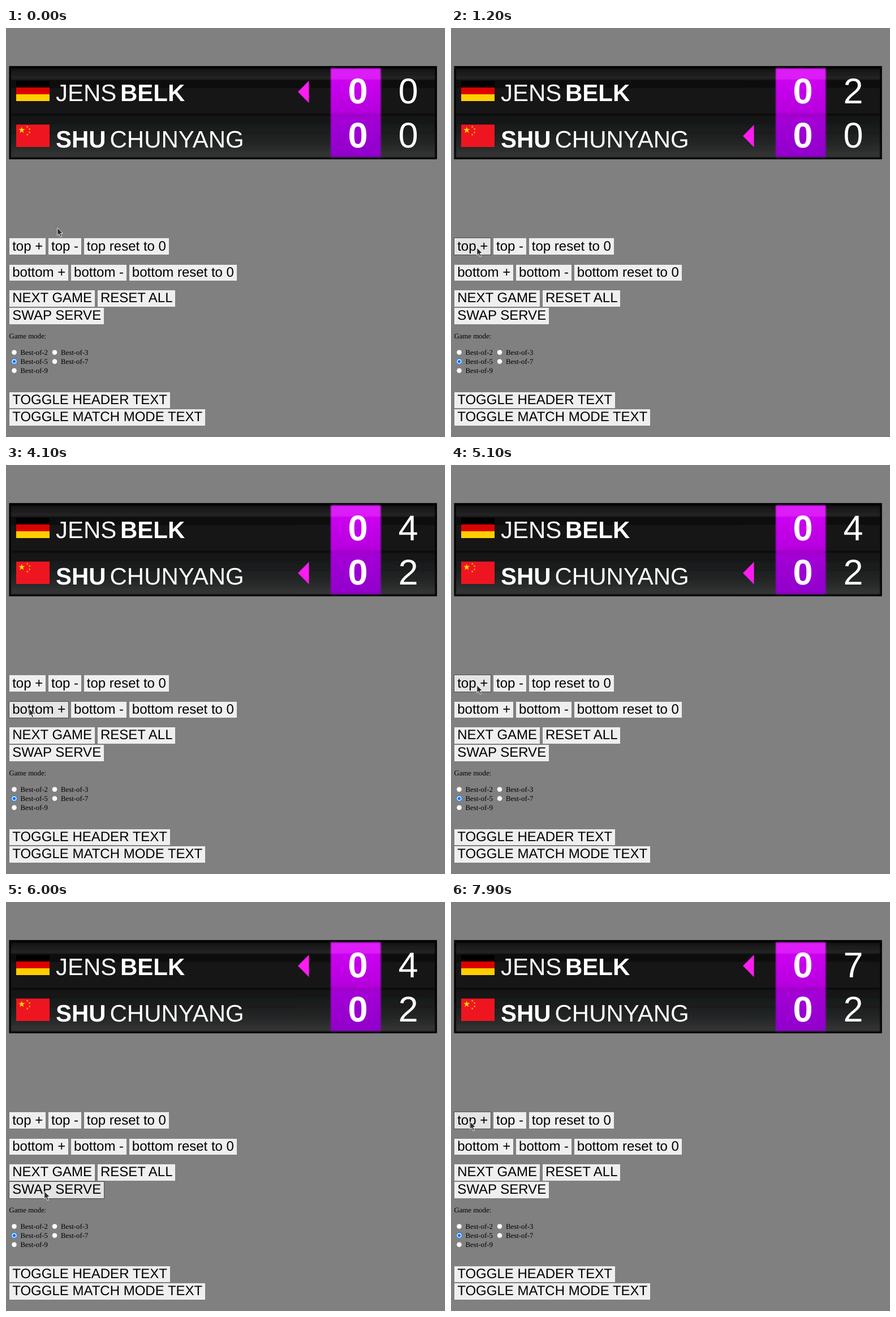
An HTML page for the animation above (8000 ms loop, 776 by 722 pixels).

```html
<!DOCTYPE html>
<html lang="en">
<head>
<meta charset="utf-8">
<title>Score board</title>
<style>
  html, body { margin: 0; width: 100%; height: 100%; overflow: hidden; background: #808080; }
  body { text-rendering: geometricPrecision; }
  svg { position: absolute; left: 0; top: 0; }
  .sans { font-family: "Liberation Sans", Arial, sans-serif; fill: #fff; }
  .name { font-size: 42px; }
  .score { font-size: 63px; text-anchor: middle; }
  .bold { font-weight: bold; }
  .label { font: 12.8px "Liberation Serif", "Times New Roman", serif; }
  .row { position: absolute; left: 5.4px; display: flex; gap: 3.2px; }
  .button {
    box-sizing: border-box; height: 30.8px; padding: .2px 4.8px; border: 1px solid #7f7f7f;
    font: 24px/27px "Liberation Sans", Arial, sans-serif; white-space: pre;
    color: #000; background: #efefef;
  }
  .hover { background: #e4e4e5; border-color: #4c4c4c; }
  .pressed { background: #f5f5f5; }
</style>
</head>
<body>
<svg id="board" width="776" height="722">
  <defs>
    <linearGradient id="panel" gradientUnits="userSpaceOnUse" x1="0" y1="70" x2="0" y2="230">
      <stop offset="0" stop-color="#0a0a0a"/>
      <stop offset=".03" stop-color="#181818"/>
      <stop offset=".12" stop-color="#242424"/>
      <stop offset=".14" stop-color="#101010"/>
      <stop offset=".49" stop-color="#171717"/>
      <stop offset=".515" stop-color="#0e0e0e"/>
      <stop offset=".55" stop-color="#141616"/>
      <stop offset=".8" stop-color="#212323"/>
      <stop offset="1" stop-color="#363737"/>
    </linearGradient>
    <linearGradient id="games" gradientUnits="userSpaceOnUse" x1="0" y1="70" x2="0" y2="230">
      <stop offset="0" stop-color="#c010dc"/>
      <stop offset=".025" stop-color="#de1cf8"/>
      <stop offset=".12" stop-color="#dc20f6"/>
      <stop offset=".14" stop-color="#cc00f0"/>
      <stop offset=".49" stop-color="#b600de"/>
      <stop offset=".52" stop-color="#a000c8"/>
      <stop offset=".56" stop-color="#a400d6"/>
      <stop offset=".97" stop-color="#9200cc"/>
      <stop offset="1" stop-color="#7c00b0"/>
    </linearGradient>
    <filter id="soft"><feGaussianBlur stdDeviation="1"/></filter>
    <polygon id="star" fill="#ffde00" points="0,-1 .225,-.309 .951,-.309 .363,.118 .588,.809 0,.382 -.588,.809 -.363,.118 -.951,-.309 -.225,-.309"/>
  </defs>

  <rect x="5.400" y="67.200" width="756.400" height="164.500"/>
  <rect x="8.500" y="70.500" width="750" height="158" fill="url(#panel)" filter="url(#soft)"/>
  <rect x="574" y="71" width="88.500" height="157" fill="url(#games)" filter="url(#soft)"/>

  <rect x="18" y="93.500" width="59" height="12"/>
  <rect x="18" y="105" width="59" height="12" fill="#d00"/>
  <rect x="18" y="117" width="59" height="12" fill="#ffce00"/>
  <rect x="18" y="170.500" width="59" height="39.500" fill="#ef1520"/>
  <use href="#star" transform="translate(27.800 180.400) scale(5.900)"/>
  <g id="stars"></g>

  <g class="sans name">
    <text x="88" y="129">JENS</text>
    <text class="bold" x="202" y="129">BELK</text>
    <text class="bold" x="88" y="211">SHU</text>
    <text x="183.500" y="211">CHUNYANG</text>
  </g>
  <g class="sans score">
    <text class="bold" x="622" y="132.600">0</text>
    <text class="bold" x="622" y="210.600">0</text>
    <text id="top" x="711" y="132.600"></text>
    <text id="bottom" x="711" y="210.600"></text>
  </g>
  <path id="serve" d="M516 112.800L535.500 93V132.500z" fill="#ff1cf0"/>

  <text class="label" x="5.400" y="548">Game mode:</text>
  <g id="modes" class="label"></g>
</svg>

<svg id="pointer" width="20" height="26" viewBox="-2 -2 20 26">
  <path d="M.8 .9V14.200L3.900 11.500L6.300 17L8.600 16L6.300 10.600L10.300 10.300z"
        fill="#2b2b2b" stroke="#fff" stroke-width=".9"/>
</svg>

<script>
const $ = id => document.getElementById(id);
const LOOP = 8000, STEP = 100;

const rows = [
  [370.4, 'top +', 'top -', 'top reset to 0'],
  [416.5, 'bottom +', 'bottom -', 'bottom reset to 0'],
  [462.2, 'NEXT GAME', 'RESET ALL'],
  [493, 'SWAP SERVE'],
  [641.5, 'TOGGLE HEADER TEXT'],
  [672.3, 'TOGGLE MATCH MODE TEXT']
];
const buttons = [];
for (const [y, ...labels] of rows) {
  const row = document.createElement('div');
  row.className = 'row';
  row.style.top = y + 'px';
  for (const label of labels) {
    const button = document.createElement('div');
    button.textContent = label;
    button.className = 'button';
    row.append(button);
    buttons.push(button);
  }
  document.body.insertBefore(row, $('pointer'));
}

$('stars').innerHTML = [[37.7, 174.4], [41.6, 178.4], [41.6, 184.3], [37.7, 188.2]]
  .map(([x, y]) => `<use href="#star" transform="translate(${x} ${y}) scale(2)"/>`).join('');

$('modes').innerHTML = [2, 3, 5, 7, 9].map((games, i) => {
  const x = 14.5 + i % 2 * 71.5, y = 572.6 + (i >> 1) * 16.1, on = games === 5;
  return `<circle cx="${x}" cy="${y}" r="4.7" fill="#fff" stroke="${on ? '#0075ff' : '#767676'}" stroke-width="${on ? 1 : .8}"/>` +
    (on ? `<circle cx="${x}" cy="${y}" r="2.8" fill="#0075ff"/>` : '') +
    `<text x="${x + 11}" y="${y + 4.6}">Best-of-${games}</text>`;
}).join('');

// Pointer path: time, x, y
const path = [
  [0, 90, 352], [400, 45, 387], [3100, 45, 387], [3200, 31, 442], [3500, 31, 442],
  [4100, 40, 429], [4200, 40, 429], [4700, 46, 387], [5000, 46, 387], [5100, 45, 388],
  [5900, 67, 510], [6400, 67, 510], [7100, 35, 391], [7200, 35, 391], [7500, 33, 387], [LOOP, 33, 387]
];
// Score states: time, top, bottom, server row
const plays = [
  [0, 0, 0, 0], [800, 1, 0, 0], [1200, 2, 0, 1], [3200, 4, 0, 0], [3600, 4, 1, 0], [4000, 4, 2, 1],
  [6000, 4, 2, 0], [6500, 4, 2, 1], [7300, 5, 2, 1], [7700, 6, 2, 0], [7900, 7, 2, 0]
];

function pointerAt(t) {
  const i = path.findIndex(p => p[0] > t);
  const [t0, x0, y0] = path[i - 1], [t1, x1, y1] = path[i];
  const u = (t - t0) / (t1 - t0), e = u * u * (3 - 2 * u);
  return [x0 + (x1 - x0) * e, y0 + (y1 - y0) * e];
}

function draw(now) {
  const t = Math.floor(now % LOOP / STEP) * STEP;
  const [x, y] = pointerAt(t).map(Math.round);
  $('pointer').style.transform = `translate(${x - 2}px, ${y - 2}px)`;
  for (const b of buttons) {
    const r = b.getBoundingClientRect();
    const over = x >= r.left && x < r.right && y >= r.top && y < r.bottom;
    b.classList.toggle('hover', over);
    b.classList.toggle('pressed', over && t === 1100);
  }
  const [, top, bottom, server] = plays.findLast(p => p[0] <= t);
  $('top').textContent = top;
  $('bottom').textContent = bottom;
  $('serve').setAttribute('transform', `translate(0 ${server * 78})`);
}

const start = performance.now();
function tick() {
  draw(performance.now() - start);
  requestAnimationFrame(tick);
}
tick();
</script>
</body>
</html>
```
